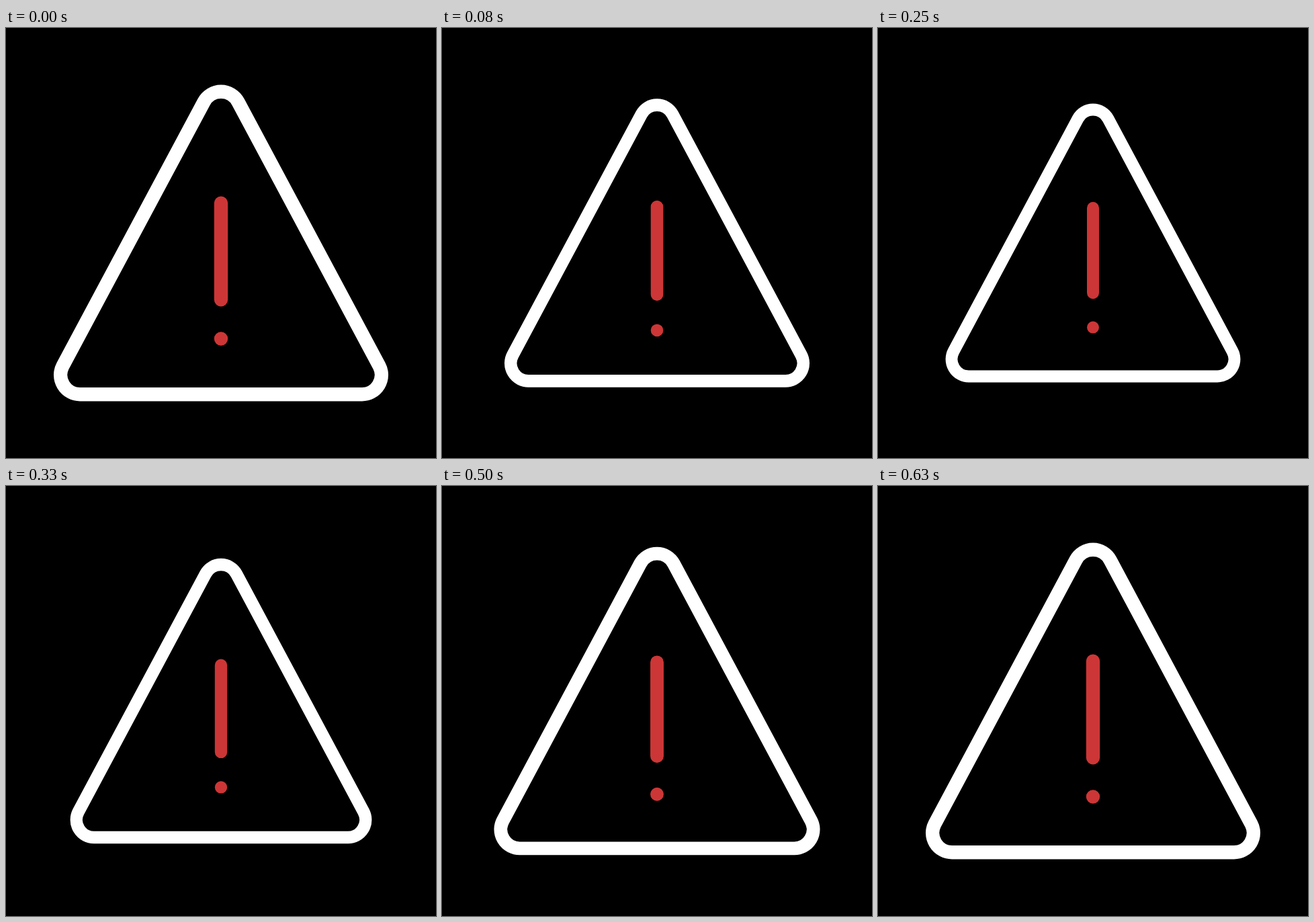
An HTML page that plays this animation: 640x640 px, repeating every 1.54 s.

```html
<!DOCTYPE html>
<html lang="en">
<head>
<meta charset="utf-8">
<title>Warning pulse</title>
<style>
  html, body { margin: 0; height: 100%; overflow: hidden; background: #000; }
  svg { display: block; width: 100%; height: 100%; }
</style>
</head>
<body>
<svg viewBox="0 0 640 640">
  <g id="sign" fill="none" stroke-width="20.4" stroke-linecap="round">
    <path stroke="#fff" d="M110.1 545.2A28.9 28.9 0 0 1 84.6 502.7L294.5 110.1A28.9 28.9 0 0 1 345.5 110.1L555.4 502.7A28.9 28.9 0 0 1 529.9 545.2Z"/>
    <path stroke="#cd3636" d="M320 260.8V404.2M320 462.5h.01"/>
  </g>
</svg>
<script>
  const LOOP = 1540, LAST = 15;
  const sign = document.getElementById('sign');
  const start = performance.now();

  // 24 steps per second, on a 10 ms clock
  const stepStart = i => Math.round(i * 100 / 24) * 10;

  function scaleAt(step) {
    const u = step % 5 / 5;
    if (step < 5) return 0.88 + 0.12 * (1 - u) ** 2.6;
    if (step < 10) return 0.88 + 0.08 * u ** 2.6;
    if (step < LAST) return 0.96 + 0.04 * u * u * (3 - 2 * u);
    return 1;
  }

  function draw(now) {
    const t = Math.max(0, now - start) % LOOP;
    let step = LAST;
    while (stepStart(step) > t) step--;
    sign.setAttribute('transform',
      `translate(320 320) scale(${scaleAt(step)}) translate(-320 -320)`);
    requestAnimationFrame(draw);
  }
  draw(start);
</script>
</body>
</html>
```
